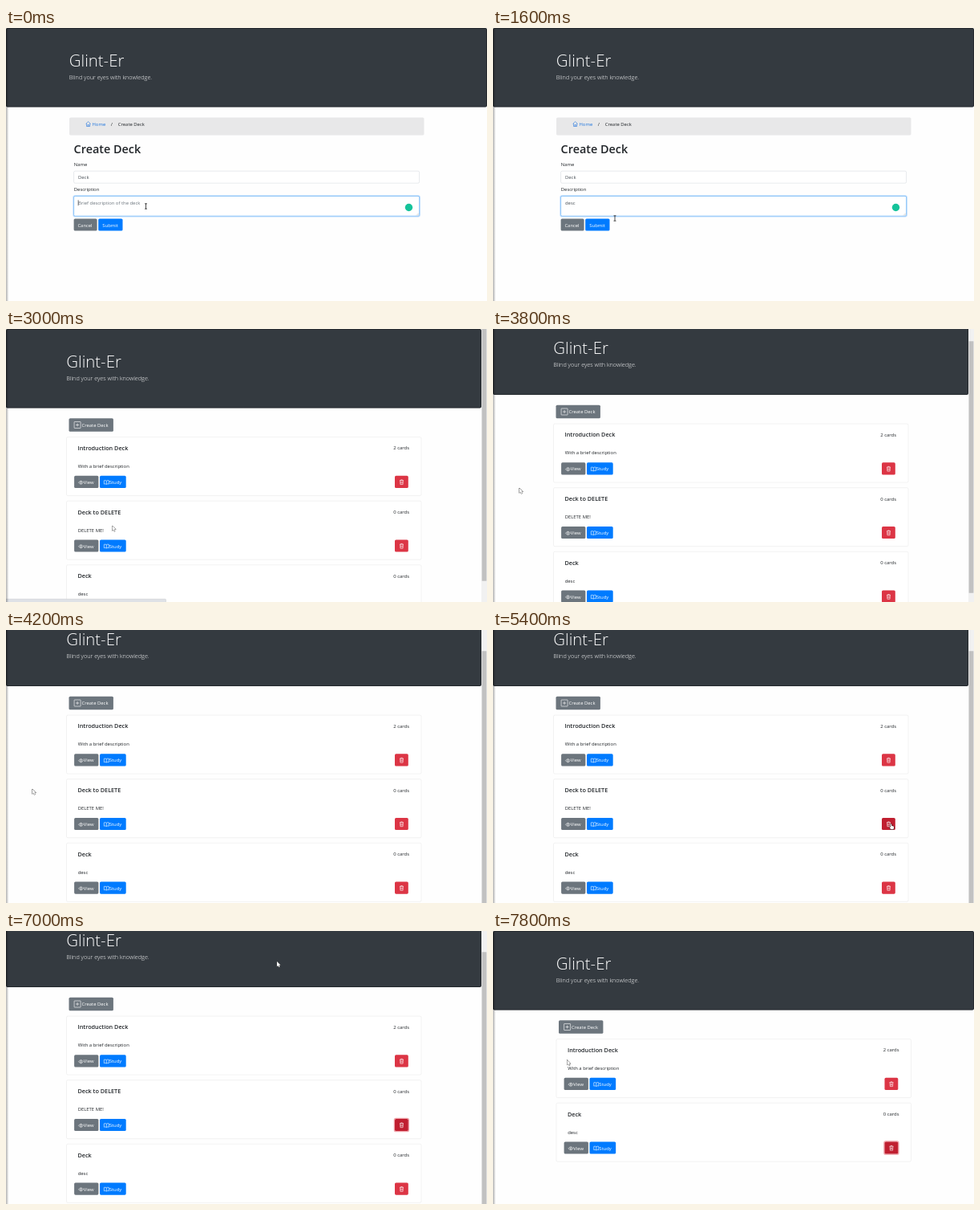
Recreate the animation shown at these times as an HTML page with a canvas. Size 600 by 340 pixels, loop 8 s.

```html
<!DOCTYPE html>
<html lang="en">
<head>
<meta charset="utf-8">
<title>Deck manager</title>
<style>
html, body { margin: 0; width: 100%; height: 100%; overflow: hidden; background: #fff; }
canvas { display: block; width: 600px; height: 340px; }
</style>
</head>
<body>
<canvas id="stage"></canvas>
<script>
const W = 600, H = 340, LOOP = 8000, STEP = 200;
const canvas = document.getElementById('stage');
const ctx = canvas.getContext('2d');
const ratio = window.devicePixelRatio || 1;
canvas.width = W * ratio;
canvas.height = H * ratio;

const INK = '#212529', GREY = '#6c757d', BLUE = '#007bff', RED = '#dc3545', DARK_RED = '#c01f30';
const FACE = '"Open Sans", "Noto Sans", sans-serif';
const BODY = 5.9, LEAD = 7.25, BAR = 7, CARD_PITCH = 79.6, MAX_SCROLL = 28.5;

const ICONS = {
  home: new Path2D('M0 3 L3 0 L6 3 M.9 2.3 V6 H5.1 V2.3 M2.3 6 V4 H3.7 V6'),
  plus: new Path2D('M.4 0 H7.6 Q8 0 8 .4 V7.6 Q8 8 7.6 8 H.4 Q0 8 0 7.6 V.4 Q0 0 .4 0 Z M4 2 V6 M2 4 H6'),
  eye: new Path2D('M0 2 Q3 -2 6 2 Q3 6 0 2 Z M4 2 A1 1 0 1 1 2 2 A1 1 0 1 1 4 2'),
  book: new Path2D('M3 .9 Q1.5 -.3 0 .5 V4.8 Q1.5 4.1 3 5.1 Q4.5 4.1 6 4.8 V.5 Q4.5 -.3 3 .9 V5.1'),
  trash: new Path2D('M0 1 H5 M1.7 1 V.2 H3.3 V1 M.6 1 L.9 6 H4.1 L4.4 1 M1.8 2.3 V4.8 M3.2 2.3 V4.8')
};

const ARROW = new Path2D('M0 0 V6.2 L1.5 4.9 L2.5 7.1 L3.5 6.7 L2.6 4.5 H4.5 Z');
const HAND = new Path2D('M-.6 .3 Q0 -.5 .6 .3 V2.3 L3 2.9 Q3.7 3.1 3.6 3.9 L3.1 6.8 H-.2 L-2 4.3 Q-1.7 3.3 -.6 4.2 Z');

// Pointer path: time, x, y
const PATH = [
  [0, 174.5, 222], [1400, 174.5, 222], [1600, 152, 237], [1800, 141, 241],
  [2000, 133, 244], [3000, 132.5, 245], [3200, 108, 235], [3600, 36, 200],
  [3800, 32.8, 198], [4200, 32.8, 198], [4600, 260, 218], [5000, 490, 240],
  [5200, 496.5, 241.5], [5600, 496.5, 241.5], [5800, 440, 160], [6200, 342, 46],
  [6400, 338, 38], [7400, 338, 38], [7600, 210, 106], [7800, 92.5, 160.5], [8000, 92.5, 160.5]
];

const clamp = v => Math.max(0, Math.min(1, v));

function pointer(t) {
  const i = PATH.findIndex(k => k[0] > t);
  const [a, b] = [PATH[i - 1], PATH[i]];
  const p = (t - a[0]) / (b[0] - a[0]);
  return [a[1] + (b[1] - a[1]) * p, a[2] + (b[2] - a[2]) * p];
}

function scrollAt(t) {
  if (t >= 7400) return 0;
  return MAX_SCROLL * (1 - (1 - clamp((t - 3600) / 570)) ** 2);
}

function box(x, y, w, h, r, fill, stroke, line = 0.5) {
  ctx.beginPath();
  ctx.roundRect(x, y, w, h, r);
  if (fill) { ctx.fillStyle = fill; ctx.fill(); }
  if (stroke) { ctx.strokeStyle = stroke; ctx.lineWidth = line; ctx.stroke(); }
}

function text(str, x, y, size = BODY, color = INK, weight = 400) {
  ctx.font = `${weight} ${size}px ${FACE}`;
  ctx.fillStyle = color;
  ctx.fillText(str, x, y);
}

function icon(name, x, y, color = '#fff') {
  ctx.save();
  ctx.translate(x, y);
  ctx.strokeStyle = color;
  ctx.lineWidth = 0.6;
  ctx.stroke(ICONS[name]);
  ctx.restore();
}

function ring(x, y, w, h, color) {
  box(x - 0.6, y - 0.6, w + 1.2, h + 1.2, 2, null, color, 1.3);
}

function header(width, x) {
  box(0, 0, width, 98.5, 1.9, '#343a40');
  box(0.5, 0.5, width - 1, 97.5, 1.6, null, 'rgba(0,0,0,.3)', 1);
  text('Glint-Er', x, 47.5, 20.4, '#fff', 300);
  text('Blind your eyes with knowledge.', x, 63.5, LEAD, '#fff', 300);
}

function formPage(t) {
  const submitted = t >= 2200;
  const hover = t >= 1800;
  header(W, 78.8);
  box(79, 111.5, 442.5, 22, 1.6, '#e8e8e9');
  icon('home', 99.6, 116.5, '#2c7be0');
  text('Home', 107.5, 122, BODY, '#1f76dd');
  text('/', 130.8, 122);
  text('Create Deck', 139.8, 122);

  text('Create Deck', 84.6, 156, 14.4, INK, 600);
  text('Name', 84.8, 171.5);
  box(84.6, 178.2, 431, 15, 1.6, '#fff', '#ced4da');
  text('Deck', 90, 188.4, BODY, '#495057');
  text('Description', 84.8, 202.6);

  if (!submitted) ring(84.6, 209.4, 431, 24.8, 'rgba(0,123,255,.25)');
  box(84.6, 209.4, 431, 24.8, 1.6, '#fff', submitted ? '#ced4da' : '#66b0f5', 0.7);
  const typed = 'desc'.slice(0, clamp((t - 200) / 800) * 4);
  if (typed) text(typed, 90, 219.7, BODY, '#495057');
  else text('Brief description of the deck', 90, 219.7, BODY, GREY);
  if (t < 200) box(89.8, 214.2, 0.6, 7, 0, INK);
  ctx.strokeStyle = '#999';
  ctx.lineWidth = 0.4;
  ctx.stroke(new Path2D('M512 233.5 L514.8 230.7 M513.6 233.5 L514.8 232.3'));
  if (!submitted) {
    ctx.beginPath();
    ctx.arc(502.5, 223.5, 4.7, 0, Math.PI * 2);
    ctx.fillStyle = '#15c39a';
    ctx.fill();
  }

  box(84.6, 237.5, 29, 15, 1.6, GREY);
  text('Cancel', 89.4, 247.5, BODY, '#fff');
  if (submitted) ring(115.2, 237.5, 30.3, 15, 'rgba(38,143,255,.5)');
  box(115.2, 237.5, 30.3, 15, 1.6, hover ? '#0069d9' : BLUE);
  text('Submit', 120.3, 247.5, BODY, '#fff');
}

function card(y, [title, note, count], pressed, focused) {
  ctx.save();
  ctx.translate(0, y);
  box(79, 0, 442.5, 73, 1.6, '#fff', '#e4e4e5');
  text(title, 93, 16.3, LEAD, INK, 600);
  text(count + ' cards', 486.8, 15.8);
  text(note, 93.2, 38.3);
  box(88.6, 48.2, 30.3, 15.2, 1.6, GREY);
  icon('eye', 94, 54.6);
  text('View', 100.3, 58.3, BODY, '#fff');
  box(120.5, 48.2, 32.7, 15.2, 1.6, BLUE);
  icon('book', 125.8, 53.7);
  text('Study', 132.2, 58.3, BODY, '#fff');
  if (focused) ring(488.5, 48.2, 16.8, 15.2, 'rgba(225,83,97,.55)');
  box(488.5, 48.2, 16.8, 15.2, 1.6, pressed ? DARK_RED : RED);
  icon('trash', 494.5, 53);
  ctx.restore();
}

function listPage(t) {
  const removed = t >= 7400;
  const scroll = scrollAt(t);
  const decks = [
    ['Introduction Deck', 'With a brief description', 2],
    ['Deck to DELETE', 'DELETE ME!', 0],
    ['Deck', 'desc', 0]
  ];
  if (removed) decks.splice(1, 1);

  ctx.save();
  ctx.translate(removed ? 0 : -3.5, -scroll);
  ctx.save();
  if (!removed) ctx.translate(3.5, 0);
  header(removed ? W : W - BAR, removed ? 78.8 : 75.3);
  ctx.restore();
  box(82, 111.2, 55.4, 16.6, 1.6, GREY);
  icon('plus', 88.6, 115.5);
  text('Create Deck', 98, 121.9, BODY, '#fff');
  decks.forEach((deck, i) =>
    card(134.6 + i * CARD_PITCH, deck, i === 1 && t >= 5200, i === 1 && t >= 5600));
  ctx.restore();

  if (!removed) {
    box(W - BAR, 0, BAR, H, 0, '#f1f1f1');
    box(W - BAR + 0.6, scroll * 0.92, BAR - 1.2, 313.7, 0, '#c1c1c1');
  }
  if (t < 3400) box(-1, 336.3, 200.5, 5, 1, '#dee1e6', '#c8cacd');
}

function dialog() {
  ctx.save();
  ctx.shadowColor = 'rgba(0,0,0,.35)';
  ctx.shadowBlur = 4;
  ctx.shadowOffsetY = 1;
  box(213, -2, 174, 54, 1.6, '#fff');
  ctx.restore();
  text('This page says', 219.5, 11, 5.8, INK);
  text('Delete this deck?', 219.5, 21.5, 5.1, '#5f6368');
  box(323, 34.5, 26, 12, 1.5, '#1a73e8');
  text('OK', 332, 42.4, 5, '#fff', 600);
  box(353, 34.5, 27, 12, 1.5, '#fff', '#dadce0');
  text('Cancel', 358, 42.4, 5, '#1a73e8', 600);
}

function drawPointer(t) {
  const [x, y] = pointer(t);
  ctx.save();
  ctx.translate(x, y);
  ctx.lineJoin = 'round';
  if (t < 1800) {
    ctx.strokeStyle = '#222';
    ctx.lineWidth = 0.8;
    ctx.stroke(new Path2D('M-1.5 -3.2 H1.5 M0 -3.2 V3.2 M-1.5 3.2 H1.5'));
  } else {
    const hand = t < 2800 || (t >= 5200 && t < 5800);
    const shape = hand ? HAND : ARROW;
    ctx.strokeStyle = hand ? '#111' : '#444';
    ctx.lineWidth = 0.9;
    ctx.stroke(shape);
    ctx.fillStyle = '#fff';
    ctx.fill(shape);
  }
  ctx.restore();
}

function edgeShade() {
  const side = ctx.createLinearGradient(0, 0, 3.5, 0);
  side.addColorStop(0, 'rgba(0,0,0,.3)');
  side.addColorStop(1, 'rgba(0,0,0,0)');
  ctx.fillStyle = side;
  ctx.fillRect(0, 0, 3.5, H);
}

function draw(t) {
  ctx.setTransform(ratio, 0, 0, ratio, 0, 0);
  ctx.fillStyle = '#fefefe';
  ctx.fillRect(0, 0, W, H);
  if (t < 2800) formPage(t);
  else listPage(t);
  edgeShade();
  if (t >= 5600 && t < 6800) dialog();
  drawPointer(t);
}

const start = performance.now();
function tick() {
  const t = (performance.now() - start) % LOOP;
  draw(Math.floor(t / STEP) * STEP);
  requestAnimationFrame(tick);
}
tick();
</script>
</body>
</html>
```
